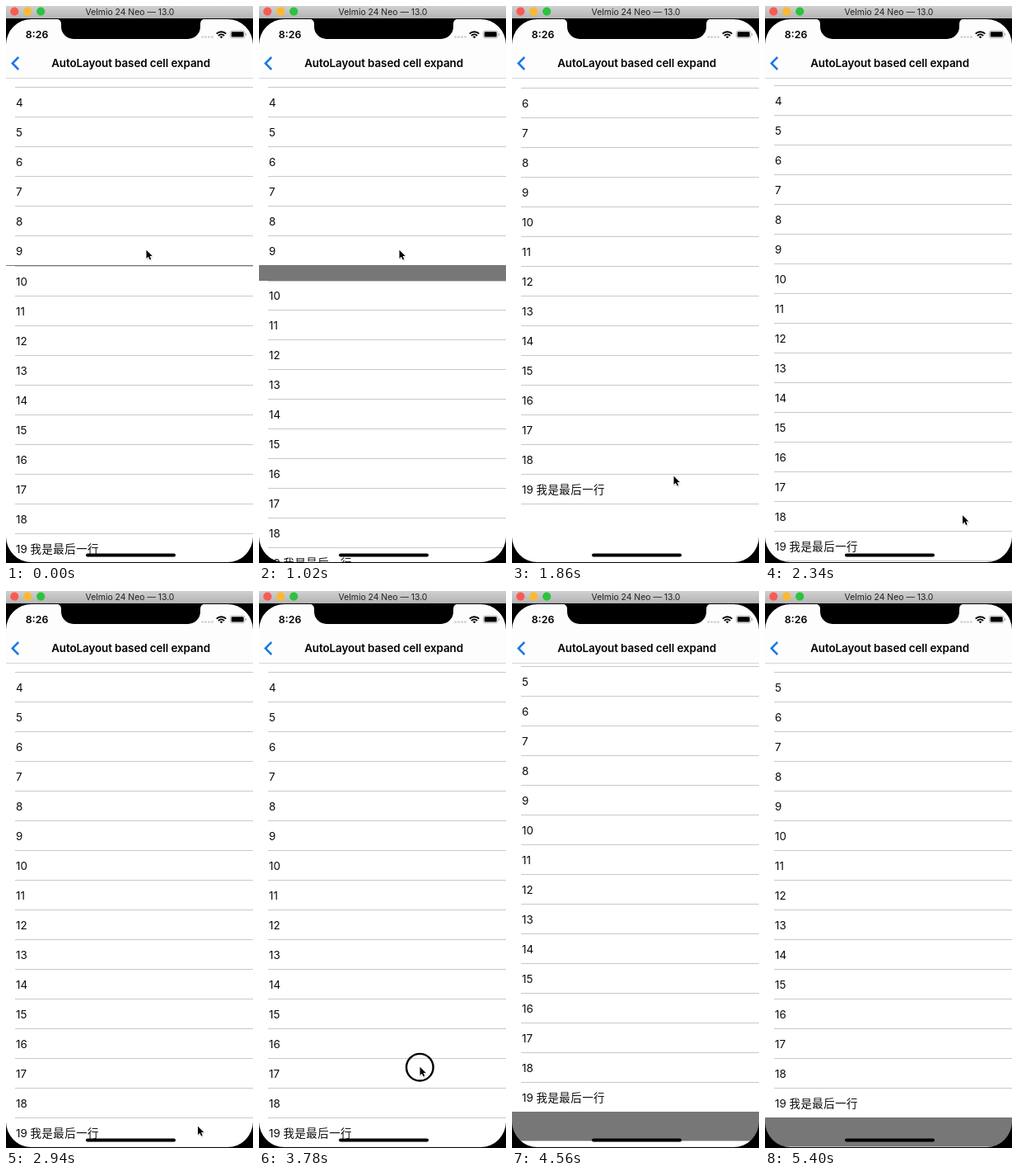
An HTML page for the animation above (5.52 s loop, 300 px wide and 675 px high).

```html
<!DOCTYPE html>
<html lang="en">
<head>
<meta charset="utf-8">
<title>Cell expand</title>
<style>
  html, body { margin: 0; width: 100%; height: 100%; overflow: hidden; background: #000; }
  #stage { position: relative; width: 300px; height: 675px; overflow: hidden; background: #fff; }
  .row {
    position: absolute; left: 0; width: 300px; height: 36px;
    font: 13.4px/36px Inter, "Noto Sans CJK SC", "Noto Sans CJK", sans-serif; color: #0a0a0a;
  }
  .row span { position: absolute; left: 12px; white-space: pre; }
  .row i { font-style: normal; letter-spacing: .52px; }
  .line, .panel { position: absolute; }
  .line { left: 11px; right: 0; height: 1px; background: #c9c9cb; }
  .panel { left: 0; width: 300px; background: #777; }
  svg { position: absolute; left: 0; top: 0; }
  text { font-family: Inter, "Liberation Sans", sans-serif; }
</style>
</head>
<body>
<div id="stage">
  <div id="list"></div>
  <svg width="300" height="675" viewBox="0 0 300 675">
    <defs>
      <linearGradient id="bar" x1="0" y1="0" x2="0" y2="1">
        <stop offset="0" stop-color="#d0d0d0"/>
        <stop offset="1" stop-color="#b4b4b4"/>
      </linearGradient>
    </defs>

    <!-- navigation bar -->
    <rect y="15" width="300" height="72" fill="#fdfdfd"/>
    <rect y="87" width="300" height="1" fill="#d6d6d8"/>
    <path d="M15.2 62L7.8 69.5L15.2 77" fill="none" stroke="#1a78e4" stroke-width="2.5"/>
    <text x="151.6" y="74.2" text-anchor="middle" font-size="13.4" font-weight="600" letter-spacing="-.08">AutoLayout based cell expand</text>

    <!-- status bar -->
    <text x="23.8" y="39" font-size="12.4" font-weight="600">8:26</text>
    <g fill="#cfcfcf">
      <circle cx="238.7" cy="37.6" r="1.4"/><circle cx="242.6" cy="37.6" r="1.4"/>
      <circle cx="246.5" cy="37.6" r="1.4"/><circle cx="250.4" cy="37.6" r="1.4"/>
    </g>
    <g fill="none" stroke="#000" stroke-width="1.9">
      <path d="M255.7 33.6A8.3 8.3 0 0 1 267.3 33.6"/>
      <path d="M257.9 36A5.2 5.2 0 0 1 265.1 36"/>
    </g>
    <path d="M259.6 37.3A2.8 2.8 0 0 1 263.4 37.3L261.5 39.3Z"/>
    <rect x="272.4" y="30" width="17.6" height="8.8" rx="2.4" fill="#fff" stroke="#a8a8a8" stroke-width=".8"/>
    <rect x="273.7" y="31.3" width="15" height="6.2" rx="1.3"/>
    <path d="M291 33v3q1.2-.4 1.2-1.5t-1.2-1.5Z" fill="#a8a8a8"/>

    <!-- device edge, notch and home bar -->
    <path fill-rule="evenodd" d="M0 15H300V675H0ZM31 16H269A31 31 0 0 1 300 47V643A31 31 0 0 1 269 674H31A31 31 0 0 1 0 643V47A31 31 0 0 1 31 16Z"/>
    <path d="M61 15.5Q67 16 67 22V25A15 15 0 0 0 82 40H221A15 15 0 0 0 236 25V22Q236 16 242 15.5Z"/>
    <rect x="97" y="663.5" width="109" height="4" rx="2"/>

    <!-- window title -->
    <rect width="300" height="15" fill="url(#bar)"/>
    <circle cx="10.3" cy="6.6" r="5.1" fill="#fb5a53"/>
    <circle cx="26.2" cy="6.6" r="5.1" fill="#fcb92f"/>
    <circle cx="42.2" cy="6.6" r="5.1" fill="#2ac33f"/>
    <text x="150.5" y="10.8" text-anchor="middle" font-size="10.4" fill="#222">Velmio 24 Neo — 13.0</text>

    <g id="pointer">
      <circle id="ring" cx=".3" cy="1.2" r="16.3" fill="none" stroke="#000" stroke-width="2.4"/>
      <path d="M1 1V13L3.6 10.6L5.4 14.2L7.2 13.4L5.6 9.8H9Z" fill="#000" opacity=".18"/>
      <path d="M.5 .8V11L2.9 8.8L4.6 12.4L6.2 11.7L4.6 8.1H7.8Z" stroke="#fff" stroke-width="1.4" paint-order="stroke"/>
    </g>
  </svg>
</div>
<script>
const LOOP = 5520, STEP = 60, ROW = 36, OPEN = 35, REST = 36;
const FIRST = 3, LAST = 19, TOP = 98.93 - ROW;

// [time, x, y] of the pointer tip
const path = [
  [0, 170, 295], [1140, 170, 295], [1380, 188, 660], [1440, 188, 660],
  [1860, 196, 569], [2340, 239.5, 616.5], [2640, 232.5, 648], [3360, 232.5, 648],
  [3660, 194, 590], [3780, 195, 576], [4140, 201.5, 490], [4260, 203, 474],
  [4320, 203, 474], [4440, 286, 50], [4500, 330, -60]
];
const presses = [[720, 900], [1440, 1860], [2880, 2940], [3660, 4260]];
// [time, scroll offset] while dragging
const drags = [
  [0, 0], [1500, 0], [1680, 40], [1860, 71], [1861, 0],
  [3780, 0], [3900, 24], [4020, 48], [4140, 69], [4260, 79]
];

function at(table, t, col) {
  const n = table.findIndex(k => k[0] > t);
  if (n < 0) return table[table.length - 1][col];
  const a = table[n - 1], b = table[n];
  return a[col] + (b[col] - a[col]) * (t - a[0]) / (b[0] - a[0]);
}

function ease(t, start, length) {
  const u = Math.min(1, Math.max(0, (t - start) / length));
  return u * u * (3 - 2 * u);
}

// critically damped return after an overscroll
function bounce(ms) {
  const u = ms * 0.0109;
  return (1 + u) * Math.exp(-u);
}

function scrollAt(t) {
  if (t >= 4860) return REST;
  if (t >= 4260) return REST + 43 * bounce(t - 4260);
  if (t >= 1860 && t < 2520) return 71 * bounce(t - 1860);
  return at(drags, t, 1);
}

function gapAt(n, t) {
  if (n === 9) return OPEN * (ease(t, -22, 262) - ease(t, 900, 250));
  return n === LAST && t > 3780 ? OPEN : 0;
}

function add(parent, name) {
  const el = document.createElement('div');
  el.className = name;
  return parent.appendChild(el);
}

const list = document.getElementById('list');
const pointer = document.getElementById('pointer');
const ring = document.getElementById('ring');
const rows = [];
for (let n = FIRST; n <= LAST; n++) {
  const el = add(list, 'row');
  el.innerHTML = `<span>${n}${n === LAST ? ' <i lang="zh-CN">我是最后一行</i>' : ''}</span>`;
  rows.push({ n, el, line: add(list, 'line'), panel: add(list, 'panel') });
}

function draw(t) {
  let y = TOP - scrollAt(t);
  for (const { n, el, line, panel } of rows) {
    const gap = gapAt(n, t), height = Math.round(gap);
    const edge = Math.round(y + ROW) - 1;
    el.style.top = Math.round(y) + 'px';
    panel.style.top = edge + 'px';
    panel.style.height = height + 'px';
    line.style.top = edge + height + 'px';
    y += ROW + gap;
  }
  pointer.setAttribute('transform', `translate(${at(path, t, 1)} ${at(path, t, 2)})`);
  ring.style.display = presses.some(([a, b]) => t >= a && t < b) ? '' : 'none';
}

const start = performance.now();
function tick() {
  const t = (performance.now() - start) % LOOP;
  draw(Math.floor(t / STEP) * STEP);
  requestAnimationFrame(tick);
}
tick();
</script>
</body>
</html>
```
